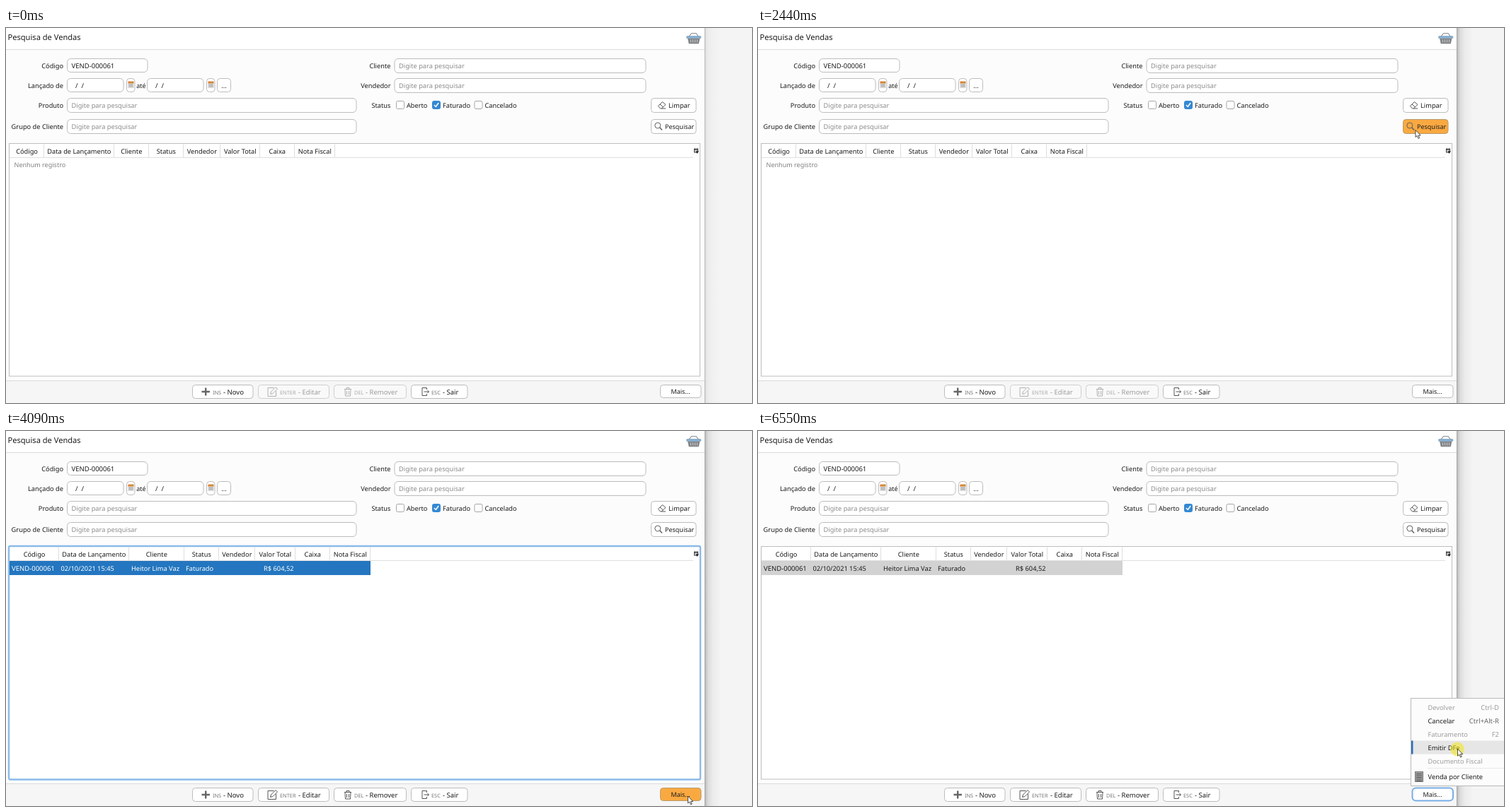
Write an HTML page that moves like this. It is 1054 by 531 pixels and loops after 8 s.

```html
<!DOCTYPE html>
<html lang="pt-BR">
<head>
<meta charset="utf-8">
<title>Pesquisa de Vendas</title>
<style>
html, body { margin: 0; width: 100%; height: 100%; overflow: hidden; background: #f4f4f4; }
svg { display: block; width: 100vw; height: 100vh; }
text { font-family: "Noto Sans", "Open Sans", sans-serif; white-space: pre; text-rendering: geometricPrecision; }
</style>
</head>
<body>
<svg id="stage" viewBox="0 0 1054 531" xmlns="http://www.w3.org/2000/svg"></svg>
<script>
const LOOP = 8000;
const INK = '#1c1c1c', DIM = '#9c9c9c', EDGE = '#bcbcbc', BLUE = '#2376bf', FOCUS = '#8bbbe9';

// Each step holds until the next one starts.
const steps = [
  { at: 0, shade: .35 },
  { at: 820, shade: .35, search: 'hover', cursor: [929, 144.5] },
  { at: 1620, search: 'press', cursor: [929, 144.5], click: [928, 143] },
  { at: 2440, search: 'hover', cursor: [929, 144.5] },
  { at: 3270, search: 'hover', cursor: [929, 144.5], row: 'active' },
  { at: 4090, more: 'hover', cursor: [963.5, 517], row: 'active' },
  { at: 4910, more: 'press', cursor: [963.5, 517], row: 'idle', click: [962.5, 517.5] },
  { at: 5730, more: 'focus', cursor: [988.5, 456], row: 'idle', menu: true },
  { at: 6550, more: 'focus', cursor: [988.5, 450], row: 'idle', menu: true, click: [988, 450.5] }
];

const text = (x, y, s, { size = 9.25, fill = INK, anchor = 'start', weight = 400 } = {}) =>
  `<text x="${x}" y="${y}" font-size="${size}" fill="${fill}" text-anchor="${anchor}" font-weight="${weight}">${s}</text>`;
const rect = (x, y, w, h, fill, stroke = 'none', r = 0, sw = 1) =>
  `<rect x="${x}" y="${y}" width="${w}" height="${h}" rx="${r}" fill="${fill}" stroke="${stroke}" stroke-width="${sw}"/>`;
const path = (d, stroke = '#555', fill = 'none', sw = 1) =>
  `<path d="${d}" fill="${fill}" stroke="${stroke}" stroke-width="${sw}" stroke-linejoin="round"/>`;
const line = (x1, y1, x2, y2, color) => path(`M${x1} ${y1}L${x2} ${y2}`, color);
const label = (x, y, s) => text(x, y, s, { anchor: 'end' });
const box = (x, y, w, h) => rect(x, y, w, h, '#fff', EDGE, 5);

function field(x, y, w, value, h = 20) {
  return box(x, y, w, h) +
    text(x + 6, y + 13.2, value || 'Digite para pesquisar', { fill: value ? INK : '#8c8c8c', size: value ? 9.5 : 9.25 });
}

function calendar(x) {
  return rect(x, 71.5, 11.5, 19, '#fff', EDGE, 4) +
    rect(x + 2, 76, 8, 9, '#d4d4d4') + rect(x + 2, 75.5, 8, 3, '#d8873c') +
    line(x + 3, 80.5, x + 9, 80.5, '#a8a8a8') + line(x + 3, 82.5, x + 9, 82.5, '#a8a8a8');
}

function checkbox(x, on, name) {
  return rect(x, 103.5, 11, 11, on ? '#3488d4' : '#fff', on ? '#3488d4' : '#a6a6a6', 2) +
    (on ? path(`M${x + 2.5} 109l2.2 2.5 4-5.5`, '#fff', 'none', 1.5) : '') +
    text(x + 14.4, 112.8, name);
}

function basket() {
  return path('M965 12L968.5 7.5H975L978.5 12', '#8c8f92', 'none', 1.2) +
    path('M963.5 15H980L978.5 22H965Z', '#777a7d', '#85888b', .6) +
    rect(961.5, 11.5, 20.5, 3, '#84afd4', '#7d9ab4', 1, .6) +
    [967.5, 970.5, 973.5, 976.5].map(x => line(x, 16.5, x, 20.5, '#c8c8c8')).join('');
}

// Button face shared by the two animated buttons.
function face(x, y, w, h, state) {
  if (state === 'press') return rect(x - .5, y - .5, w + 1.5, h + 1, '#3173b4', '#8fc0f0', 4, 2.2) +
    rect(x + .8, y + .8, w - 1.2, h - 1.6, 'none', '#2b66a2', 3, .8);
  if (state === 'focus') return rect(x, y, w, h, '#fff', '#78aee5', 5, 2);
  return rect(x, y, w, h, state === 'hover' ? '#faa941' : '#fff', state === 'hover' ? '#b99a6c' : EDGE, 4);
}

function searchButton(state) {
  const press = state === 'press', color = press ? '#e4edf5' : '#606060';
  return face(911.5, 129.5, 63.5, 20, state) +
    `<circle cx="920.8" cy="138" r="4" fill="none" stroke="${color}"/>` +
    path('M923.8 141L927 144.5', color, 'none', 1.5) +
    text(press ? 930 : 931, 142.8, 'Pesquisar',
      press ? { fill: '#fff', weight: 700, size: 8.8 } : { size: 9 });
}

function moreButton(state) {
  const press = state === 'press';
  return face(924.5, 505.5, 57.5, 18, state) +
    text(press ? 938.5 : 939.5, 517.6, 'Mais...', press ? { fill: '#fff', weight: 700, size: 9 } : { size: 9 });
}

function form() {
  return text(2.5, 17, 'Pesquisa de Vendas', { size: 11.1 }) + basket() +
    label(81, 56.7, 'Código') + field(86.5, 43.5, 113.5, 'VEND-000061', 19) +
    label(81, 84.8, 'Lançado de') + box(86.5, 71.5, 79.5, 19) + text(98, 85, '/  /', { size: 9.5 }) +
    calendar(170.5) + text(184.3, 84.8, 'até', { size: 9 }) +
    box(199.5, 71.5, 79.5, 19) + text(211, 85, '/  /', { size: 9.5 }) + calendar(283.5) +
    rect(298.5, 71.5, 19, 19, '#fff', EDGE, 4) + text(308, 84.5, '...', { anchor: 'middle' }) +
    label(81, 112.8, 'Produto') + field(86.5, 99.5, 408.5) +
    label(81, 142.8, 'Grupo de Cliente') + field(86.5, 129.5, 408.5) +
    label(543.5, 56.7, 'Cliente') + field(549, 43.5, 355) +
    label(543.5, 84.8, 'Vendedor') + field(549, 71.5, 355) +
    label(543.5, 112.8, 'Status') +
    checkbox(551.5, false, 'Aberto') + checkbox(602.5, true, 'Faturado') + checkbox(662, false, 'Cancelado') +
    rect(911.5, 99.5, 63.5, 20, '#fff', EDGE, 4) +
    path('M921.5 110.5L927.5 104.5L932 108.5L926 114H924.5ZM924 108L928.5 112M926 114H932') +
    text(936, 112.8, 'Limpar');
}

function table(row) {
  const names = ['Código', 'Data de Lançamento', 'Cliente', 'Status', 'Vendedor', 'Valor Total', 'Caixa', 'Nota Fiscal'];
  const stops = row ? [5, 74.5, 173.5, 251.5, 300.5, 351.5, 408.5, 457.5, 514.5]
                    : [5, 53.5, 152.5, 201.5, 250.5, 302.5, 358.5, 407.5, 464.5];
  const active = row === 'active';
  let out = active ? rect(4, 163, 977, 330.5, '#fff', FOCUS, 2, 2.4)
                   : rect(4.5, 163.5, 976, 329.5, '#fff', '#bebebe');
  out += line(5, 183.5, 971, 183.5, '#e0e0e0');
  names.forEach((name, i) => {
    out += text((stops[i] + stops[i + 1]) / 2 + .3, 177.5, name, { anchor: 'middle' }) +
      line(stops[i + 1], 164.5, stops[i + 1], 183, '#dedede');
  });
  out += rect(972.5, 171, 5, 5, '#fff', '#333') + line(972, 172.5, 978, 172.5, '#333') +
    path('M974.5 174.5H978.5L976.5 177.5Z', '#222', '#222', .5);
  if (!row) return out + text(11.5, 197, 'Nenhum registro', { size: 9.05, fill: '#808080' });
  const fill = active ? '#fff' : INK;
  return out + rect(5, 184, 510, 20, active ? BLUE : '#d2d2d2') +
    text(8, 197.8, 'VEND-000061', { fill, size: 9.5 }) +
    text(77.5, 197.8, '02/10/2021 15:45', { fill }) +
    text(177, 197.8, 'Heitor Lima Vaz', { fill }) +
    text(254, 197.8, 'Faturado', { fill }) +
    text(406.5, 197.8, 'R$ 604,52', { fill, anchor: 'end' });
}

function action(x, w, key, keyX, name, nameX, icon, on = true) {
  const color = on ? '#555' : '#b0b0b0';
  return rect(x, 505.5, w, 19, on ? '#fff' : '#f9f9f9', on ? EDGE : '#cfcfcf', 4) + icon(color) +
    text(keyX, 518.8, key, { size: 7.4, fill: on ? '#777' : '#aaa' }) +
    text(nameX, 518.8, '- ' + name, { size: 9.5, fill: on ? INK : DIM });
}

function footer(row) {
  const on = !!row;
  const plus = () => path('M276.5 515H288M282.2 509.5V520.5', '#666', 'none', 2.4);
  const pen = c => path('M378.5 509.5H370V521.5H381.5V514', c) +
    path('M373.5 518.5L374.5 515L381 508.5L383.5 511L377 517.5Z', c);
  const bin = c => path('M478 511.5H488M481 511V509.5H485V511M479 512L479.5 521H486.5L487 512M481.5 514V519M484.5 514V519', c);
  const exit = c => path('M594.5 512V509.5H588V520.5H594.5V518M590.5 515H597.5M595.5 513L597.5 515L595.5 517', c);
  return action(263.5, 85.5, 'INS', 292, 'Novo', 307, plus) +
    action(356.5, 100, 'ENTER', 387, 'Editar', 413, pen, on) +
    action(463.5, 102, 'DEL', 492, 'Remover', 508, bin, on) +
    action(572.5, 79.5, 'ESC', 601, 'Sair', 617, exit);
}

function menu() {
  const items = [['Devolver', 'Ctrl-D', 0], ['Cancelar', 'Ctrl+Alt-R', 1], ['Faturamento', 'F2', 0],
    ['Emitir DFe', '', 1], ['Documento Fiscal', '', 0]];
  let out = rect(922.5, 378.5, 134, 124, '#fcfcfc', '#b9b9b9') +
    rect(923, 438.5, 131, 19, '#e6e6e6') + rect(923, 438.5, 2.5, 19, '#2f6fb8');
  items.forEach(([name, key, on], i) => {
    const y = 394.8 + i * 19;
    out += text(946.5, y, name, { fill: on ? INK : DIM }) +
      text(1047, y, key, { anchor: 'end', size: 9.5, fill: on ? '#666' : DIM });
  });
  out += line(946, 477.5, 1054, 477.5, '#e8e8e8') + rect(928.5, 482.5, 11, 14, '#a0a0a0', '#777');
  for (let y = 485.5; y < 496; y += 2.5) out += line(930, y, 938, y, '#555');
  return out + text(946.5, 493.2, 'Venda por Cliente', { size: 9.3 });
}

function draw(s) {
  const { shade = 1 } = s;
  let out = `<defs><linearGradient id="shade"><stop offset="0" stop-color="#bdbdbd"/>
    <stop offset=".2" stop-color="#dcdcdc"/><stop offset=".55" stop-color="#ececec"/>
    <stop offset="1" stop-color="#f2f2f2"/></linearGradient></defs>` +
    rect(0, 0, 1054, 531, '#f4f4f4') + `<g opacity="${shade}">${rect(988, 0, 20, 531, 'url(#shade)')}</g>` +
    rect(0, 0, 988, 531, '#fcfcfc') + rect(0, 0, 988, 30, '#fff') + line(0, 30.5, 988, 30.5, '#dcdcdc') +
    rect(0, 499, 988, 32, '#f6f6f6') + line(0, 499.5, 988, 499.5, '#dadada') +
    line(987.5, 0, 987.5, 531, shade < 1 ? '#b4b4b4' : '#a6a6a6');
  out += form() + searchButton(s.search) + table(s.row) + footer(s.row) + moreButton(s.more);
  if (s.menu) out += menu();
  if (s.click) out += `<circle cx="${s.click[0]}" cy="${s.click[1]}" r="10" fill="#f2e61e" opacity=".57"/>`;
  if (s.cursor) out += `<g transform="translate(${s.cursor})">` +
    path('M0 0V10L2.3 8L4 12L5.7 11.2L4 7.5H7.2Z', '#222', '#fff', .8) + '</g>';
  return out;
}

const stage = document.getElementById('stage');
const start = performance.now();
let shown;

function tick() {
  const t = (performance.now() - start) % LOOP;
  const step = steps.filter(s => s.at <= t).pop() || steps[0];
  if (step !== shown) stage.innerHTML = draw(shown = step);
  requestAnimationFrame(tick);
}
tick();
</script>
</body>
</html>
```
